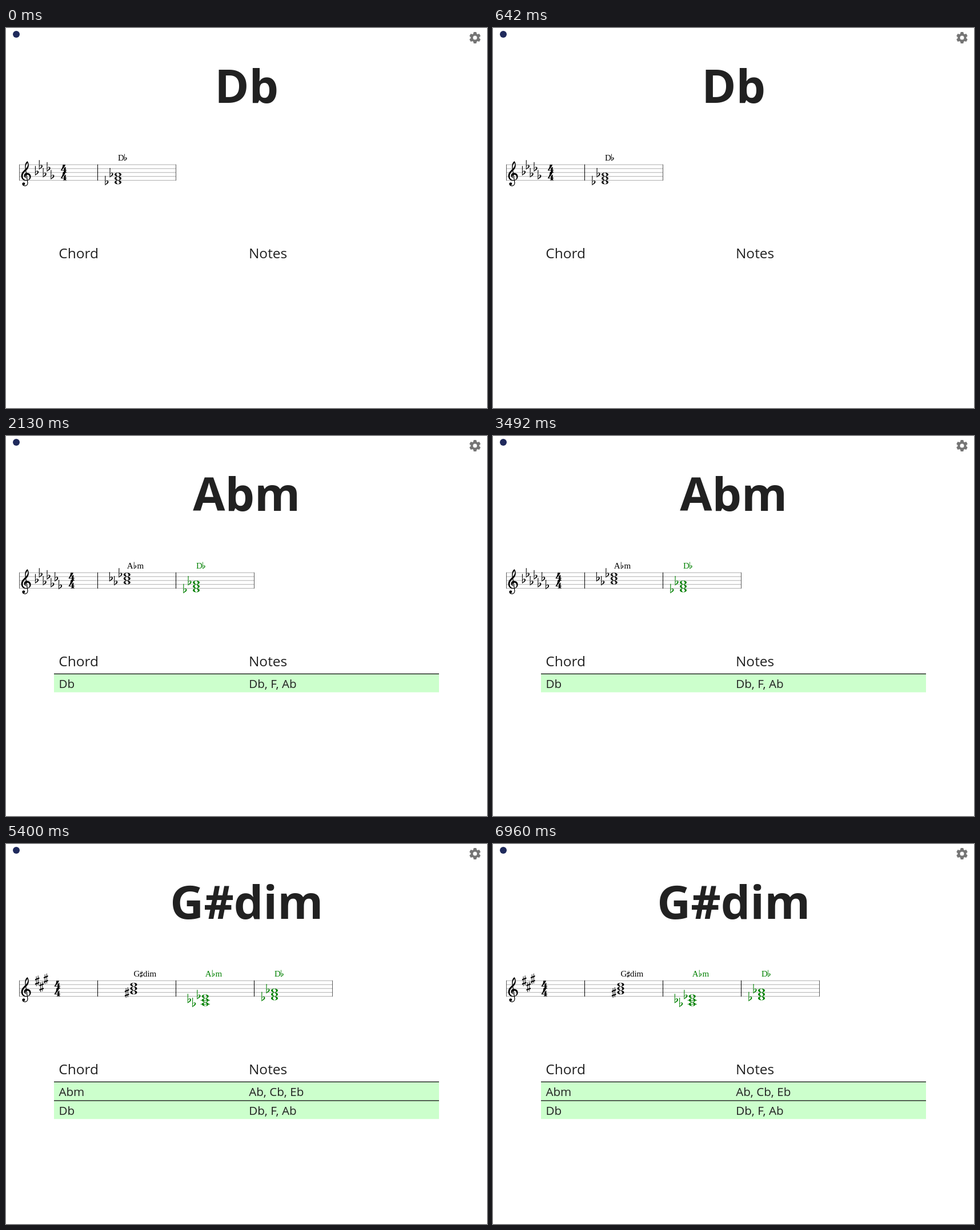
An HTML page for the animation above (8000 ms loop, 842 px wide and 665 px high).

```html
<!DOCTYPE html>
<html lang="en">
<head>
<meta charset="utf-8">
<title>Chord practice</title>
<style>
  html, body { margin: 0; width: 100%; height: 100%; overflow: hidden; background: #fff; }
  svg { display: block; width: 842px; height: 665px; }
  text { font-family: "Open Sans", "Noto Sans", sans-serif; fill: #212121; }
  .title { font-size: 81.5px; font-weight: 700; text-anchor: middle; }
  .head { font-size: 24.5px; }
  .cell { font-size: 20.6px; }
  .label { font: 15px "Liberation Serif", serif; }
</style>
</head>
<body>
<svg id="stage" viewBox="0 0 842 665"></svg>
<script>
const GREEN = '#008000', BLACK = '#000';
const SCALE = 0.685, LEFT = 23.5, TOP = 239.2, BAR = 137, LOOP = 8000;

// Glyphs in staff units: 10 units between two staff lines.
const GLYPH = {
  clef: 'M14.5 9C13 0 16-6 20.5-9C24.5-4 25 4 21.5 10C18 16 9 20 8.5 29C8.5 36 13 39.3 18 39.3C24 39.3 26.3 35 25.8 31C25.2 27 22 25 19 26C15 27 14.5 32 18.5 35C11.5 33.5 10.5 27 13 23.5C17 18.5 29.3 20 29.3 30.5C29.3 37 24 41 17 41C10 41 4.5 36 4.5 28.5C4.5 19 13 14 18 8C21 4 22.5 0 21-4C18-3 15.5 1 16.3 9Z',
  stem: 'M14.5 8L16.3 8L21.7 44C23 51 19 55 14 55C9.5 55 7 52 7 49C7 44.5 14 44 14.3 48.5C14.5 51 12 52 11.5 52.5C16 54.5 21 52 20 45Z',
  flat: 'M0-16.5H1.7L1.4-2.2C3.4-5.4 9-5.6 9-1.2C9 3 3 5 .6 7.5H0ZM1.4 0V5C3.8 3 6.2 .6 6.2-1.8C6.2-4.4 2-3.5 1.4 0Z',
  sharp: 'M2.6-11H3.9V-5.6L7.1-6.8V-13H8.4V-7.3L11-8.3V-5L8.4-4V3.9L11 2.9V6.2L8.4 7.2V12H7.1V7.7L3.9 8.9V14H2.6V9.4L0 10.4V7.1L2.6 6.1V-1.8L0-.8V-4.1L2.6-5.1ZM3.9-2.3V5.6L7.1 4.4V-3.5Z',
  four: 'M5 0H12C10 6 6 10 2.5 13.5H8V9L12.5 5V13.5H15V15H12.5C12.5 18 13 18.7 15 19V20H5.5V19C7.5 18.7 8 18 8 15H0V13.5C3 10 5 5 5 0Z',
  whole: 'M-8.8 0A8.8 5 0 1 0 8.8 0A8.8 5 0 1 0-8.8 0ZM-2.1-3.7A4.3 3.1 60 1 0 2.1 3.7A4.3 3.1 60 1 0-2.1-3.7Z'
};

const KEYS = {
  flat: { heights: [20, 5, 25, 10, 30, 15, 35], step: 10 },
  sharp: { heights: [0, 15, -5], step: 11 }
};

const staffY = units => TOP + units * SCALE;
const staffX = units => LEFT + units * SCALE;

const glyph = (name, x, y, color = BLACK, scale = SCALE) =>
  `<path d="${GLYPH[name]}" fill="${color}" fill-rule="evenodd" transform="translate(${x} ${y}) scale(${scale})"/>`;
const line = (x1, y1, x2, y2, color, width) =>
  `<path d="M${x1} ${y1}L${x2} ${y2}" stroke="${color}" stroke-width="${width}"/>`;
const text = (kind, x, y, value, color = '#212121') =>
  `<text class="${kind}" x="${x}" y="${y}" style="fill:${color}">${value}</text>`;

function label(x, [root, sign, rest], color) {
  const mark = sign === 'flat'
    ? glyph('flat', x + (root === 'A' ? 12 : 11.2), 228.8, color, 0.5)
    : glyph('sharp', x + 10.9, 227.8, color, 0.46);
  return text('label', x, 232, root, color) + mark +
    text('label', x + (sign === 'flat' ? 17.8 : 16.4), 232, rest, color);
}

// notes: staff heights; signs: [height, offset from the note centre]
function chord({ x, name, notes, signs, color = BLACK }) {
  const ledgers = notes.filter(n => n >= 50).map(n =>
    line(x - 8.2, staffY(n), x + 8.2, staffY(n), color, 0.9));
  return label(x, name, color) + ledgers.join('') +
    notes.map(n => glyph('whole', x, staffY(n), color)).join('') +
    signs.map(([n, dx]) => glyph(name[1], x + dx, staffY(n), color)).join('');
}

function stave(key, count, timeX, chords) {
  const end = LEFT + BAR * (chords.length + 1);
  let out = '';
  for (let i = 0; i < 5; i++) out += line(LEFT, staffY(i * 10), end, staffY(i * 10), '#999', 0.8);
  for (let i = 0; i <= chords.length + 1; i++) {
    const x = LEFT + BAR * i, edge = x === LEFT || x === end;
    out += line(x, staffY(-0.5), x, staffY(40.5), edge ? '#333' : BLACK, edge ? 0.8 : 1);
  }
  out += glyph('clef', LEFT, TOP) + glyph('stem', LEFT, TOP);
  KEYS[key].heights.slice(0, count).forEach((h, i) => {
    out += glyph(key, staffX(40 + i * KEYS[key].step), staffY(h));
  });
  out += glyph('four', timeX, TOP) + glyph('four', timeX, staffY(20));
  return out + chords.map(chord).join('');
}

// The check mark pushes the centred title to the left.
function title(value, checkX) {
  const check = checkX
    ? `<path d="M${checkX} 97.3l3.2 3.2l6.4-6.4" fill="none" stroke="${GREEN}" stroke-width="1.2"/>` : '';
  return text('title', checkX ? 414.7 : 421.2, 131.3, value) + check;
}

const table = rows => rows.map(([name, notes], i) => {
  const y = 415.7 + i * 32.8;
  return `<rect x="84" y="${y}" width="674" height="32.8" fill="#cfc"/>` +
    `<rect x="84" y="${y}" width="674" height="1.3" fill="#111"/>` +
    text('cell', 92.4, y + 25.3, name) + text('cell', 425.2, y + 25.3, notes);
}).join('');

const dFlat = (x, color) => ({
  x, color, name: ['D', 'flat', ''], notes: [25, 35, 45], signs: [[25, -14.5], [45, -22.7]]
});
const aFlatMinor = (x, top, color) => ({
  x, color, name: ['A', 'flat', 'm'], notes: [top, top + 10, top + 20],
  signs: [[top, -14.5], [top + 20, -22.7], [top + 10, -31]]
});
const gSharpDim = x => ({
  x, name: ['G', 'sharp', 'dim'], notes: [10, 20, 30], signs: [[30, -15.6]]
});

const rowD = ['Db', 'Db, F, Ab'], rowA = ['Abm', 'Ab, Cb, Eb'];
const first = stave('flat', 5, 96, [dFlat(196)]);
const second = stave('flat', 7, 109.7, [aFlatMinor(211.8, 5), dFlat(333, GREEN)]) + table([rowD]);
const third = stave('sharp', 3, 84.8, [gSharpDim(223.5), aFlatMinor(348.8, 40, GREEN), dFlat(470, GREEN)]) +
  table([rowA, rowD]);

const steps = [
  [0, title('Db') + first],
  [1070, title('Abm', 511) + second],
  [2130, title('Abm') + second],
  [4400, title('G#dim', 547.8) + third],
  [5400, title('G#dim') + third]
];

const teeth = [0, 60, 120, 180, 240, 300].map(a =>
  `<path d="M-3.2-6L-2.3-9.9H2.3L3.2-6Z" transform="rotate(${a})"/>`).join('');
const fixed = '<circle cx="18" cy="11" r="6" fill="#1f2a5c"/>' +
  `<g transform="translate(821 17)" fill="#757575">${teeth}` +
  '<circle r="5.5" fill="none" stroke="#757575" stroke-width="4"/></g>' +
  text('head', 92.2, 403, 'Chord') + text('head', 424.9, 403, 'Notes');

const stage = document.getElementById('stage');
stage.innerHTML = fixed + steps.map(([, art]) => `<g display="none">${art}</g>`).join('');
const scenes = [...stage.children].slice(-steps.length);
const start = performance.now();
let shown = -1;

function draw() {
  const time = (performance.now() - start) % LOOP;
  const now = steps.filter(([at]) => at <= time).length - 1;
  if (now !== shown) {
    scenes.forEach((scene, i) => scene.setAttribute('display', i === now ? 'inline' : 'none'));
    shown = now;
  }
  requestAnimationFrame(draw);
}
draw();
</script>
</body>
</html>
```
